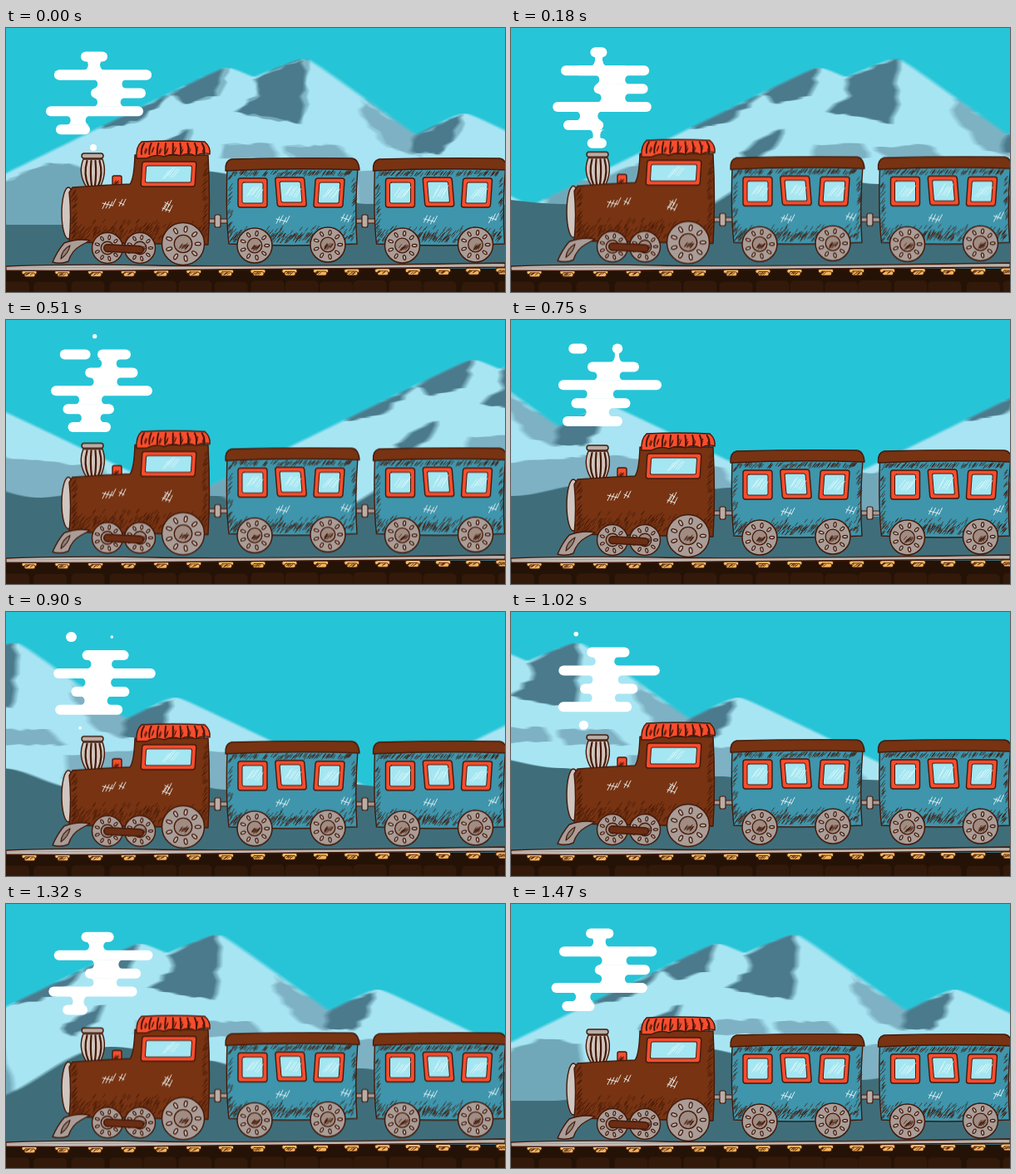
An HTML page with a canvas for the animation above (1.5 s loop, 600x318 px).

```html
<!DOCTYPE html>
<html>
<head>
<meta charset="utf-8">
<style>
  html, body { margin: 0; width: 100%; height: 100%; overflow: hidden; background: #29c5d8; }
  canvas { display: block; }
</style>
</head>
<body>
<canvas id="stage" width="600" height="318"></canvas>
<script>
const LOOP = 1500, STEP = 30, SPAN = 870, ROW = 43.8;
const INK = '#43190a', BROWN = '#773312', RED = '#f74d2e', GREY = '#aa9d98', TEAL = '#3e95ac', GLASS = '#a4e6f1';
const SKY = '#29c5d8', SNOW = '#a9e5f4', SLATE = '#7fb3c4', ROCK = '#4c7c8d', HILL = '#406f7c', SHINE = '#eef6f6';
const stage = document.getElementById('stage').getContext('2d');
let c = stage, seed = 7;

const random = () => (seed = seed * 16807 % 2147483647) / 2147483647;
const between = (a, b) => a + (b - a) * random();
const mix = (a, b, f) => a + (b - a) * f;

function layer(width, draw) {
  const canvas = document.createElement('canvas');
  canvas.width = width;
  canvas.height = 318;
  c = canvas.getContext('2d');
  c.lineJoin = c.lineCap = 'round';
  draw();
  c = stage;
  return canvas;
}

function at(x, y, draw) {
  c.save();
  c.translate(x, y);
  draw();
  c.restore();
}

function shape(path, fill, stroke, width = 1.4) {
  if (fill) { c.fillStyle = fill; c.fill(path); }
  if (stroke) { c.strokeStyle = stroke; c.lineWidth = width; c.stroke(path); }
}

const svg = (d, ...style) => shape(new Path2D(d), ...style);

function disc(x, y, rx, ry, ...style) {
  const path = new Path2D();
  path.ellipse(x, y, rx, ry, 0, 0, 7);
  shape(path, ...style);
}

function box(x, y, w, h, r, ...style) {
  const path = new Path2D();
  path.roundRect(x, y, w, h, r);
  shape(path, ...style);
}

function line(x1, y1, x2, y2, color = INK, width = 1) {
  svg(`M${x1} ${y1} L${x2} ${y2}`, null, color, width);
}

// Short pen strokes scattered over a box
function hatch(x, y, w, h, count, dx = 3, dy = -4) {
  for (let i = 0; i < count; i++) {
    const px = x + random() * w, py = y + random() * h;
    line(px, py, px + dx, py + dy, INK, 0.7);
  }
}

function scratches(x, y, count) {
  for (let i = 0; i < count; i++) {
    const px = x + i * 4, py = y + between(-2, 2);
    line(px, py + 4, px + 4, py - 4, SHINE, 0.9);
  }
  line(x, y - 1, x + count * 3, y + 2, SHINE, 0.9);
}

// Each peak: x, y, slope to the left, slope to the right
const PEAKS = [[266, 48, 0.49, 0.44], [358, 37, 0.42, 0.72], [551, 103, 0.5, 0.48]];

const skyline = x => Math.min(...PEAKS.map(([px, py, left, right]) =>
  py + (x < px ? left : right) * (Math.hypot(x - px, 7) - 7)));

// Shaded rock: a few corners joined by ragged edges
function crag(color, ...corners) {
  const path = new Path2D();
  corners.forEach(([x, y], i) => {
    const [nx, ny] = corners[(i + 1) % corners.length];
    const pieces = Math.ceil(Math.hypot(nx - x, ny - y) / 9);
    for (let k = 0; k < pieces; k++) {
      const jitter = k ? 4 : 0;
      path.lineTo(mix(x, nx, k / pieces) + between(-jitter, jitter), mix(y, ny, k / pieces) + between(-jitter, jitter) / 2);
    }
  });
  shape(path, color);
}

function mountains() {
  const range = new Path2D('M-90 318');
  for (let x = -90; x <= 810; x += 2) range.lineTo(x, skyline(x));
  range.lineTo(810, 318);
  shape(range, SNOW);
  c.clip(range);
  crag('#72a9bb', [-70, 240], [-50, 180], [0, 185], [50, 162], [100, 168], [115, 240]);
  crag(SLATE, [428, 84], [492, 126], [498, 157], [455, 140], [428, 106]);
  crag(SLATE, [262, 140], [318, 139], [326, 156], [258, 157]);
  crag(SLATE, [334, 143], [398, 141], [420, 160], [345, 161]);
  crag(SLATE, [420, 172], [540, 162], [690, 178], [720, 235], [420, 235]);
  crag(ROCK, [359, 34], [299, 62], [303, 82], [276, 101], [353, 116], [361, 75]);
  crag(ROCK, [267, 44], [220, 66], [198, 80], [216, 92], [254, 82]);
  crag(ROCK, [198, 80], [118, 112], [113, 122], [160, 112]);
  crag(ROCK, [222, 121], [190, 136], [172, 150], [186, 160], [214, 142]);
  crag(ROCK, [550, 101], [493, 129], [487, 148], [520, 153], [541, 130]);
}

const HILLS = [[0, 237], [70, 237], [230, 172], [340, 188], [435, 212], [530, 198], [614, 214], [700, 202], [830, 212], [SPAN, 237]];

function hills() {
  const path = new Path2D('M0 318');
  for (let x = 0; x <= SPAN; x += 3) path.lineTo(x, ease(HILLS, x)[0]);
  path.lineTo(SPAN, 318);
  shape(path, HILL);
}

// Smooth value between key points [position, ...values]
function ease(keys, t, curve = f => (1 - Math.cos(f * Math.PI)) / 2) {
  const i = Math.max(1, keys.findIndex(k => k[0] >= t));
  const from = keys[i - 1], to = keys[i], f = curve((t - from[0]) / (to[0] - from[0]));
  return from.slice(1).map((v, n) => mix(v, to[n + 1], f));
}

function track() {
  box(0, 290, 600, 28, 0, '#241206');
  for (let x = -12; x < 600; x += between(40, 48)) box(x, 305 + between(-1, 1), 40, 20, 5, '#331909');
  for (let i = 0; i < 16; i++) {
    const x = 28 + 38 * i + 9 * Math.sin(i * 0.21), y = 296 - x / 200;
    box(x - 9, y - 4, 18, 5, 2, '#f6bf66', INK, 1);
    box(x - 6, y - 1, 13, 5, 2, '#f3b55c', INK, 0.8);
    hatch(x - 8, y + 1, 10, 2, 6, 3, -2);
  }
  svg('M0 287 Q80 284 180 286 T600 283 V288 Q400 289 250 291 T0 292 Z', '#c3bbb6', INK, 1.3);
  line(0, 289, 600, 285, '#948880', 0.6);
}

function wheel(x, y, r) {
  at(x, y, () => {
    disc(0, 0, r, r, GREY, INK, 1.5);
    for (let i = 0; i < 9; i++) {
      c.rotate(Math.PI * 2 / 9);
      disc(r * 0.7, 0, r * 0.14, r * 0.075, '#c0b5af', INK, 1.2);
    }
    disc(0, 0, r * 0.42, r * 0.42, '#a08c82', INK, 1.3);
    hatch(-r * 0.2, r * 0.1, r * 0.4, r * 0.2, 16);
  });
}

// Window with a slightly crooked red frame
function pane(x, y, w, h, skew) {
  c.save();
  c.transform(1, 0, skew, 1, x + w / 2, y + h / 2);
  box(-w / 2, -h / 2, w, h, 3, RED, INK);
  box(-w / 2 + 5, -h / 2 + 5, w - 10, h - 10, 2, GLASS, INK, 1);
  for (let i = 0; i < 6; i++) {
    const px = -7 + i * 2.5, py = between(2, 7);
    line(px, py, px + 7, py - 10, '#e6fafc', 0.8);
  }
  c.restore();
}

function coupling(x) {
  box(x, 230, 24, 5, 0, GREY, INK, 1.1);
  box(x + 7, 225, 7, 15, 2, '#b9ada7', INK, 1.2);
}

function carriage() {
  svg('M266 168 H423 Q419 220 422 260 Q340 264 268 260 Q264 225 266 168 Z', TEAL, INK);
  hatch(268, 250, 148, 9, 170);
  hatch(268, 242, 148, 14, 70);
  hatch(268, 175, 148, 4, 110);
  hatch(266, 180, 4, 70, 30);
  hatch(415, 184, 4, 65, 25);
  svg('M264 172 Q263 160 271 158 Q345 156 416 157 Q424 158 425 171 Q345 168 264 172 Z', BROWN, INK);
  for (let i = 0; i < 3; i++) pane(279 + 46 * i, 181 - i % 2, 35, 35, Math.sin(i * 2) * 0.09);
  scratches(325, 231, 4);
  scratches(403, 229, 3);
  wheel(299, 262, 21);
  wheel(387, 261, 21);
}

function engine() {
  svg('M93 158 Q86 175 97 192 H113 Q122 174 116 158 Z', '#d0c5bd', INK);
  for (let i = -1.5; i < 2; i++) svg(`M${105 + i * 5} 160 Q${105 + i * 8} 176 ${105 + i * 4} 190`, null, INK, 2.2);
  box(91, 151, 26, 6, 3, '#b9ada5', INK);
  box(128, 178, 11, 13, 2, RED, INK);
  hatch(129, 187, 5, 3, 9);
  disc(75, 223, 8, 31, '#d0c6bf', INK);
  svg('M80 192 Q120 189 149 188 Q154 182 155 153 H243 Q246 210 243 261 L76 258 Q79 226 76 198 Z', BROWN, INK);
  hatch(79, 242, 160, 15, 150);
  hatch(79, 234, 160, 15, 60);
  hatch(78, 198, 5, 50, 40);
  hatch(236, 165, 4, 85, 40);
  svg('M163 137 Q200 135 239 137 Q246 143 245 152 Q237 149 228 154 Q219 149 210 154 Q200 150 190 155 Q180 151 169 157 H157 Q156 143 163 137 Z', RED, INK);
  for (let i = 0; i < 9; i++) {
    const x = 166 + i * 8.7;
    svg(`M${x} 139 Q${x - 4 + i} 145 ${x - 3 + i * 0.7} 152`, null, INK, 2);
    hatch(x, 148, 2, 4, 4, 2, -5);
  }
  pane(163, 161, 65, 30, -0.06);
  scratches(116, 212, 4);
  scratches(136, 211, 2);
  scratches(188, 218, 3);
  scratches(191, 211, 2);
  svg('M70 259 Q86 253 101 256 L90 262 Q79 268 75 281 Q66 285 56 282 Q62 268 70 259 Z', GREY, INK);
  svg('M66 278 Q67 267 77 262 Q75 272 66 278 Z', '#8d7d75', INK, 1.2);
  wheel(122, 265, 18.5);
  wheel(161, 265, 18.5);
  wheel(213, 260, 25.5);
  line(122, 265, 161, 267, INK, 10);
  line(122, 265, 161, 267, '#6b2d13', 7);
}

function train() {
  coupling(244);
  coupling(421);
  carriage();
  at(177.5, 0, carriage);
  engine();
}

// Smoke puffs: age in loops, centre, width
const WIDE = [[0, 105, 8], [0.5, 98, 72], [1, 106.5, 117], [1.5, 119, 124], [2, 116.5, 117], [2.24, 85, 46], [2.6, 78.5, 13], [2.74, 78, 0]];
const SPLIT = [[2, 116.5, 117], [2.34, 130, 40], [2.5, 128, 12.5], [2.64, 127, 0]];
const NARROW = [[0.56, 90, 0], [1, 80.5, 41], [1.5, 108, 71], [2, 135, 66], [2.5, 123, 62], [3, 106, 32], [3.2, 105, 12], [3.45, 108, 0]];

function puff(keys, age, startY) {
  if (age < keys[0][0] || age > keys.at(-1)[0]) return [];
  const [x, w] = ease(keys, age, f => f);
  return [{ left: x - w / 2, right: x + w / 2, w, y: startY - ROW * age }];
}

function neck(a, b) {
  const left = Math.max(a.left, b.left), width = Math.min(a.right, b.right) - left;
  if (width < 12) return;
  const mid = left + width / 2, limit = width * 0.2 - 2;
  const x = mid + Math.max(-limit, Math.min(limit, (106 - mid) * 0.35));
  const waist = width * 0.22 - 1.8, flare = width * 0.22 + 5.5;
  const ra = Math.min(flare, a.w / 2), rb = Math.min(flare, b.w / 2);
  const top = a.y + Math.min(5.5, a.w / 2 - ra), bottom = b.y - Math.min(5.5, b.w / 2 - rb);
  svg(`M${x - ra} ${top} C${x - waist} ${top} ${x - waist} ${bottom} ${x - rb} ${bottom}
    H${x + rb} C${x + waist} ${bottom} ${x + waist} ${top} ${x + ra} ${top} Z`, '#fff');
}

function smoke(p) {
  const puffs = [0, 1, 2, 3].flatMap(n =>
    [...puff(WIDE, p + n, 144), ...puff(SPLIT, p + n, 144), ...puff(NARROW, p + n, 166)]);
  for (const a of puffs) {
    const h = Math.min(12, a.w);
    box(a.left, a.y - h / 2, a.w, h, h / 2, '#fff');
    for (const b of puffs) if (Math.abs(b.y - a.y - ROW / 2) < 3) neck(a, b);
  }
}

const scenery = layer(SPAN * 2, () => {
  for (const x of [0, SPAN, SPAN * 2]) at(x, 0, mountains);
  for (const x of [0, SPAN]) at(x, 0, hills);
  c.globalCompositeOperation = 'destination-over';
  box(0, 0, SPAN * 2, 318, 0, SKY);
});
const rails = layer(600, track);
const cars = layer(700, train);

function draw(now) {
  const p = Math.floor(now % LOOP / STEP) * STEP / LOOP;
  // Averaged copies give the passing landscape its motion blur
  for (let i = 0; i < 7; i++) {
    const x = p * SPAN + (i - 3) * 1.3;
    stage.globalAlpha = 1 / (i + 1);
    stage.drawImage(scenery, x > 0 ? x - SPAN : x, 0);
    if (x > 0 && x < 10) stage.drawImage(scenery, 0, 0, x, 318, 0, 0, x, 318);
  }
  stage.globalAlpha = 1;
  smoke(p);
  stage.drawImage(rails, 0, 0);
  stage.drawImage(cars, 0, -1.8 * (1 - Math.cos(p * 4 * Math.PI)));
  requestAnimationFrame(draw);
}
requestAnimationFrame(draw);
</script>
</body>
</html>
```
